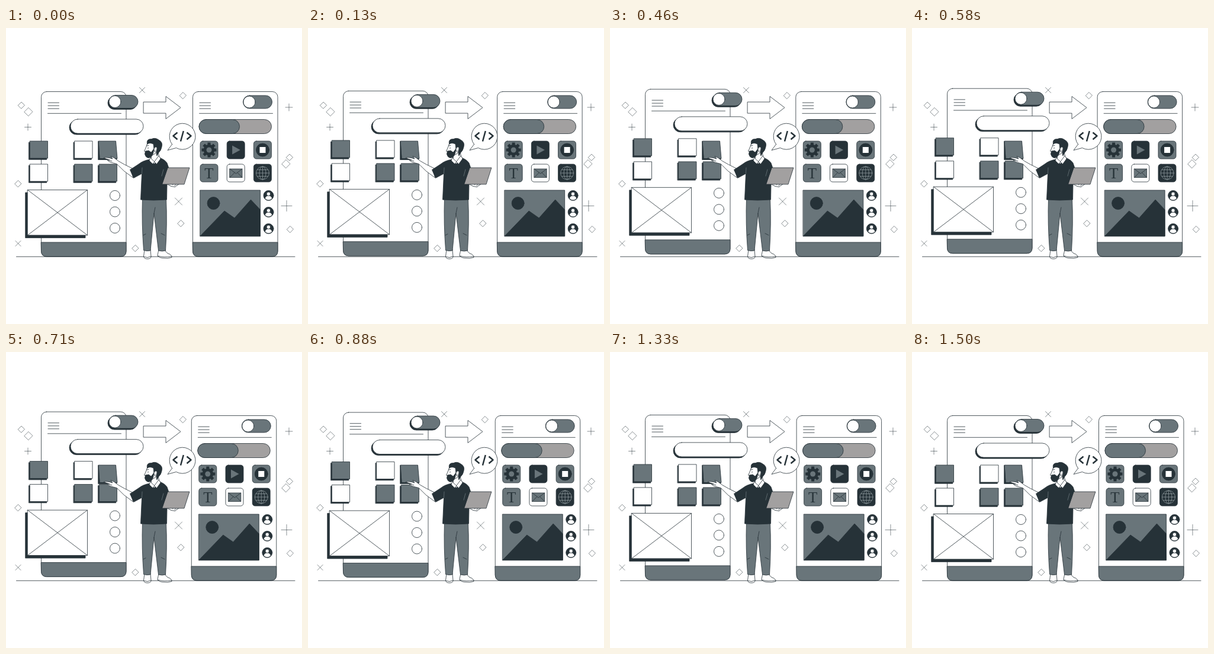
An HTML page that plays this animation: 500x500 px, repeating every 1540 ms.

```html
<!DOCTYPE html>
<html lang="en">
<head>
<meta charset="utf-8">
<title>App design</title>
<style>
html, body { margin: 0; width: 100%; height: 100%; overflow: hidden; background: #fff }
svg { display: block; width: 100%; height: 100%; stroke: #263238; stroke-width: .8; fill: #fff; stroke-linejoin: round; stroke-linecap: round }
.slate { fill: #69757a }
.dark { fill: #263238 }
.pale { fill: #a2a0a0 }
.line { fill: none }
.bare { stroke: none }
.decor { fill: none; stroke-width: .55 }
</style>
</head>
<body>
<svg viewBox="0 0 500 500">
  <path id="decor" class="decor"/>
  <path d="M17.500 386.300H488"/>
  <path d="M232.500 125H270V115.500L295 134.500 270 153.500V144H232.500Z"/>

  <g id="wireframe"></g>
  <g id="finished"></g>

  <g id="held">
    <path class="dark" d="M156 191.500L185 192 187 222.500H156Z"/>
    <path class="slate" d="M156.500 191H185.500L188 220.500H158.500Z"/>
  </g>

  <g id="bubble">
    <path d="M280.500 196.500L273 206.500 287.500 202.500A22 22 0 1 0 280.500 196.500Z"/>
    <path class="line" stroke-width="2.500" stroke-linecap="butt" d="M289.500 176.500L282.500 182.300 289.500 188.300M299.800 174L295 191.500M305.500 176.500L312.500 182.300 305.500 188.300"/>
  </g>

  <g id="man">
    <path d="M234 374L232.500 386Q233 390 239 390 245 390 245 386L244 374Z"/>
    <path d="M258 374L256 384Q257 387.500 264 388.500 274 390 280 387.500 280 383 274 381 269 379 269 374Z"/>
    <path class="line" d="M232.700 386.500Q239 389 245 386M256.200 385Q266 388 280 386"/>
    <path class="slate" d="M230.500 288Q229 330 232.500 375.500Q238 377.500 244 376L250 313 257.500 376Q264 378 269.500 376Q272.500 330 270.500 288Z"/>
    <path class="line" d="M250 313L252 303M232 350L236 348M268 350L262 347"/>
    <path d="M214 252.500Q198 242 187 229.500L177 227Q172 225 170.500 222.500L175 223 165 219.500Q168 218 175 219.500L180 221 177 216.500 183 219.500 189.500 224.500Q200 231 213 237Z"/>
    <path class="line" d="M170.500 222.500L179 225"/>
    <path d="M246 213L245 223 251 231 259 220 257 208Z"/>
    <path class="dark" d="M243 222Q231 224 224 230L209.500 239.500 215.500 253.500 229.500 246 227.500 290Q249 292 271.500 290L272 264 276.500 262 277.500 244 272 228Q268 222 259 219L250 230Z"/>
    <path d="M244 218L242 224 247.500 229.500 251 226 245.500 221ZM258 216L250.500 226 254.500 230 261 221Z"/>
    <path class="line" stroke="#69757a" d="M229.500 246L230 236M266 239L263 250"/>
    <path d="M239 194Q237 201 235 205L233.500 208 236 209Q236 217 242 218L252 212 257 203 253 192Z"/>
    <path class="dark" d="M238.500 196Q236.500 187 246 187.500 252 184.500 258 189 265.500 193 263 201 262 207 257.500 211L255 216Q253 211 255 207 255.500 201 251.500 201L250 205 249 196Q243 193 238.500 196Z"/>
    <path class="dark" d="M250 204L248.500 212Q246 219 240 219.500 235.500 218 234.500 213L235.500 208 241 207 245 210Z"/>
    <path d="M250 204Q252 199.500 255 202 256 206 251.500 209Z"/>
    <path class="line" d="M237.500 199L241 198.500M240 202V203.500M236.500 211.500L239.500 211"/>
    <path d="M273 264L279 267.500 286 268.500 288 266 291.500 264.500 291 260 279 260Z"/>
    <path class="line" d="M281 265L285 261.500M285 266.500L288 262"/>
    <path class="pale" d="M273.500 236H310L301 264H264Z"/>
  </g>
</svg>
<script>
const get = id => document.getElementById(id);
const rect = (cls, x, y, w, h, r = 0) =>
  `<rect class="${cls}" x="${x}" y="${y}" width="${w}" height="${h}" rx="${r}"/>`;
const circle = (cls, x, y, r) => `<circle class="${cls}" cx="${x}" cy="${y}" r="${r}"/>`;
const path = (cls, d) => `<path class="${cls}" d="${d}"/>`;
const raised = (cls, x, y, w, h, r = 0, dx = 2, dy = 2) =>
  rect('dark', x - dx, y + dy, w, h, r) + rect(cls, x, y, w, h, r);

const phone = x => rect('', x, 107.5, 143.5, 278.5, 9) +
  path('slate', `M${x} 362h143.500v15q0 9-9 9h-125.500q-9 0-9-9z`) +
  path('line', `M${x + 11.5} 126.200h18.500m-18.500 5h18.500m-18.500 5h18.500M${x + 11} 144.300h124`);

get('wireframe').innerHTML = phone(59.5) +
  raised('slate', 174, 113.5, 49, 22, 11) + circle('', 184, 124.5, 10) +
  raised('', 109, 154, 123, 24, 12) +
  [['slate', 40.5, 191], ['', 116, 191], ['', 40.5, 230], ['slate', 116, 230], ['slate', 157.5, 230]]
    .map(([cls, x, y]) => raised(cls, x, y, 30, 29, 0, 1.7, 2.2)).join('') +
  raised('', 36.5, 273.5, 101, 76.5, 0, 3.5, 4.5) +
  path('line', 'M36.500 273.500l101 76.500m0-76.500l-101 76.500') +
  [283, 310.5, 338].map(y => circle('', 184, y, 8.5)).join('');

const teeth = [...Array(8).keys()].map(i =>
  `<rect class="dark bare" x="340.500" y="193.500" width="5" height="7" transform="rotate(${i * 45} 343 206)"/>`).join('');

const avatar = y => circle('dark', 443.5, y, 8.5) +
  path('bare', `M437.800 ${y + 5}q1-4.500 5.700-4.500t5.700 4.500q-5.700 5-11.400 0z`) +
  circle('', 443.5, y - 2.7, 3.2);

get('finished').innerHTML = phone(315.5) +
  rect('slate', 400.5, 114, 49, 22, 11) + circle('', 411, 125, 10) +
  rect('pale', 326, 154.5, 122.5, 24, 12) + rect('slate', 326, 154.5, 68.5, 24, 12) +
  ['slate', 'dark', 'slate', 'slate', '', 'dark'].map((cls, i) =>
    rect(cls, 328 + i % 3 * 45.2, i < 3 ? 191 : 230, 30, 30, 4.5)).join('') +
  teeth + circle('dark', 343, 206, 9) + circle('slate bare', 343, 206, 4.5) +
  path('slate', 'M382 198l14.500 8-14.500 8z') +
  circle('dark', 433.5, 206, 11) + rect('bare', 428.5, 201, 10, 10) +
  '<text class="dark bare" x="343" y="253.500" font-size="25" text-anchor="middle" font-family="Liberation Serif, serif">T</text>' +
  rect('slate', 378, 238, 21, 14.5) + path('line', 'M378 238l10.500 8 10.500-8m-21 14.500l8-8m13 8l-8-8') +
  `<g fill="none" stroke="#8b969a">
    <circle cx="433.500" cy="245" r="11"/><ellipse cx="433.500" cy="245" rx="5.500" ry="11"/>
    <path d="M433.500 234v22m-11-11h22m-20-5.500h18m-18 11h18"/></g>` +
  rect('slate', 328, 274, 101.5, 77.5) + circle('dark', 350.5, 296, 10.5) +
  path('dark', 'M328 351.500L369 309 386 321 413.500 290 429.500 307V351.500Z') +
  [283, 311, 339].map(avatar).join('');

const diamonds = [[26, 130.5, 5.5], [38, 141.5, 7], [20.5, 263, 5.5], [299, 114, 5.5], [295.5, 330, 5.5],
  [218.5, 372, 5.5], [479, 218.5, 5.5], [473, 229.5, 7], [480, 340, 5.5]];
const pluses = [[37, 167.5, 5.5], [478, 134, 6], [474, 300.5, 9]];
const crosses = [[230, 105, 4.5], [20.5, 364, 4.5], [291.5, 293, 6]];
get('decor').setAttribute('d',
  diamonds.map(([x, y, r]) => `M${x - r} ${y}l${r} ${-r} ${r} ${r} ${-r} ${r}z`).join('') +
  pluses.map(([x, y, r]) => `M${x - r} ${y}h${2 * r}m${-r} ${-r}v${2 * r}`).join('') +
  crosses.map(([x, y, r]) => `M${x - r} ${y - r}l${2 * r} ${2 * r}m0 ${-2 * r}l${-2 * r} ${2 * r}`).join(''));

// Keys are [time in ms, offset in px], joined linearly.
const lift = [[0, 0], [750, -6.8], [1080, -3.3], [1330, -1.1], [1500, 0], [1540, 0]];
const sway = [[0, 0], [150, 5], [290, 1], [460, -1.7], [620, -2.6], [710, -2.2],
  [900, 1.2], [1080, -.9], [1330, -.4], [1500, 0], [1540, 0]];

function valueAt(keys, t) {
  const i = keys.findIndex(key => key[0] > t);
  const [t0, a] = keys[i - 1], [t1, b] = keys[i];
  return a + (b - a) * (t - t0) / (t1 - t0);
}

const LOOP = 1540, STEP = LOOP / 37;
function draw() {
  const step = Math.floor((performance.now() % LOOP + 5) / STEP) % 37;
  const t = step * STEP;
  get('wireframe').setAttribute('transform', `translate(0 ${valueAt(lift, t)})`);
  get('finished').setAttribute('transform', `translate(${valueAt(sway, t)} 0)`);
  requestAnimationFrame(draw);
}
draw();
</script>
</body>
</html>
```
